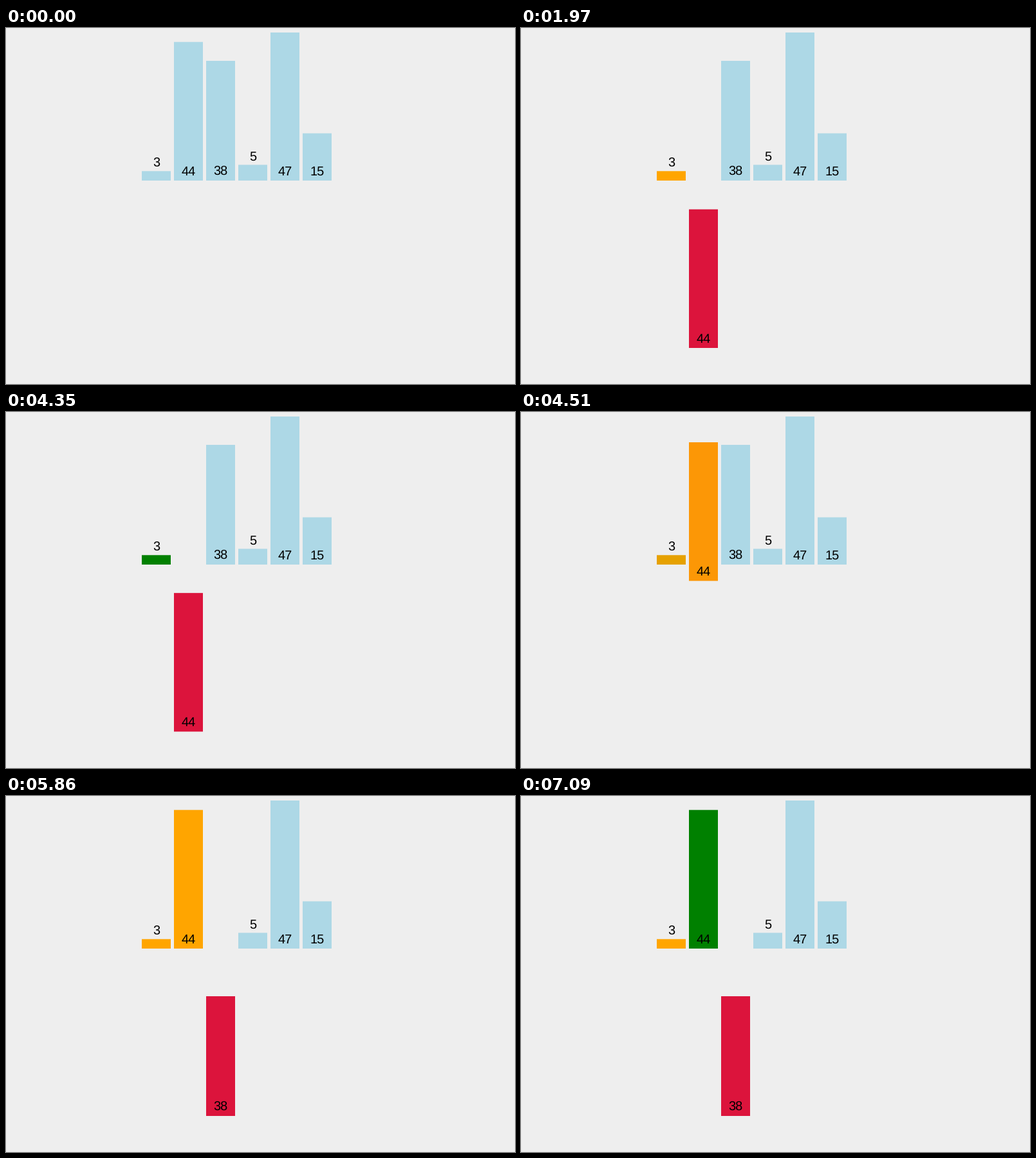
Recreate the animation shown at these times as a matplotlib script. Size 791 by 553 pixels, loop 8 s.

```python
import matplotlib.pyplot as plt
import numpy as np
from matplotlib.animation import FuncAnimation
from matplotlib.colors import to_rgb
from matplotlib.patches import Rectangle

plt.rcParams.update({
    "font.family": "Liberation Sans",
    "text.hinting": "none",
    "text.hinting_factor": 1,
})

W, H, DPI = 791, 553, 64
LOOP, STEP = 8000, 10
VALUES = [3, 44, 38, 5, 47, 15]
LEFT, PITCH, BAR_W = 211, 50, 45
BASE, DROP = 237, 260
UNIT = 230 / max(VALUES)
PAD = 7

PLAIN, SORTED, PICKED, COMPARED = "lightblue", "orange", "crimson", "green"

# begin, length, first and last visible change, number of changes,
# then per bar: (colour, drop) it moves to
MOVES = [
    (480, 125, 500, 610, 5, {0: (SORTED, 0)}),
    (1721, 250, 1750, 1970, 9, {1: (PICKED, 1)}),
    (3090, 125, 3110, 3220, 5, {0: (COMPARED, 0)}),
    (4330, 250, 4350, 4560, 9, {0: (SORTED, 0), 1: (SORTED, 0)}),
    (5614, 250, 5640, 5860, 9, {2: (PICKED, 1)}),
    (6965, 125, 6990, 7090, 5, {1: (COMPARED, 0)}),
]


def ease(p):
    """Cubic in-out."""
    return 4 * p**3 if p < 0.5 else 1 - 4 * (1 - p) ** 3


def progress(t, begin, length, first, last, count):
    """Eased progress, held between evenly spaced ticks."""
    if t < first:
        return 0.0
    if t >= last:
        return 1.0
    gap = (last - first) / (count - 1)
    tick = first + gap * int((t - first) / gap + 1e-6)
    return ease(min((tick - begin) / length, 1.0))


def pose(t):
    """Rows of r, g, b, drop for every bar at time t."""
    state = np.array([[*to_rgb(PLAIN), 0.0] for _ in VALUES])
    for *timing, targets in MOVES:
        p = progress(t, *timing)
        for i, (color, drop) in targets.items():
            state[i] += (np.array([*to_rgb(color), drop]) - state[i]) * p
    return state


fig = plt.figure(figsize=(W / DPI, H / DPI), dpi=DPI, facecolor="#eeeeee")
ax = fig.add_axes([0, 0, 1, 1])
ax.set(xlim=(0, W), ylim=(H, 0))
ax.axis("off")

bars, labels = [], []
for i, value in enumerate(VALUES):
    x, height = LEFT + i * PITCH, value * UNIT
    bars.append(ax.add_patch(
        Rectangle((x, BASE - height), BAR_W, height, lw=0, snap=False)))
    # short bars carry their label on top
    y = BASE - 1 - PAD if height > 30 else BASE - height - PAD
    labels.append((ax.text(x + BAR_W / 2, y, str(value), ha="center",
                           va="baseline", size=20 * 72 / DPI, color="black"), y))


def update(frame):
    for bar, (label, y), row in zip(bars, labels, pose(frame * STEP)):
        shift = DROP * row[3]
        bar.set_y(BASE - bar.get_height() + shift)
        bar.set_facecolor(tuple(np.clip(row[:3], 0, 1)))
        label.set_y(y + shift)
    return bars + [label for label, _ in labels]


anim = FuncAnimation(fig, update, frames=LOOP // STEP, interval=STEP,
                     init_func=lambda: update(0), repeat=True, repeat_delay=0)
plt.show()
```
